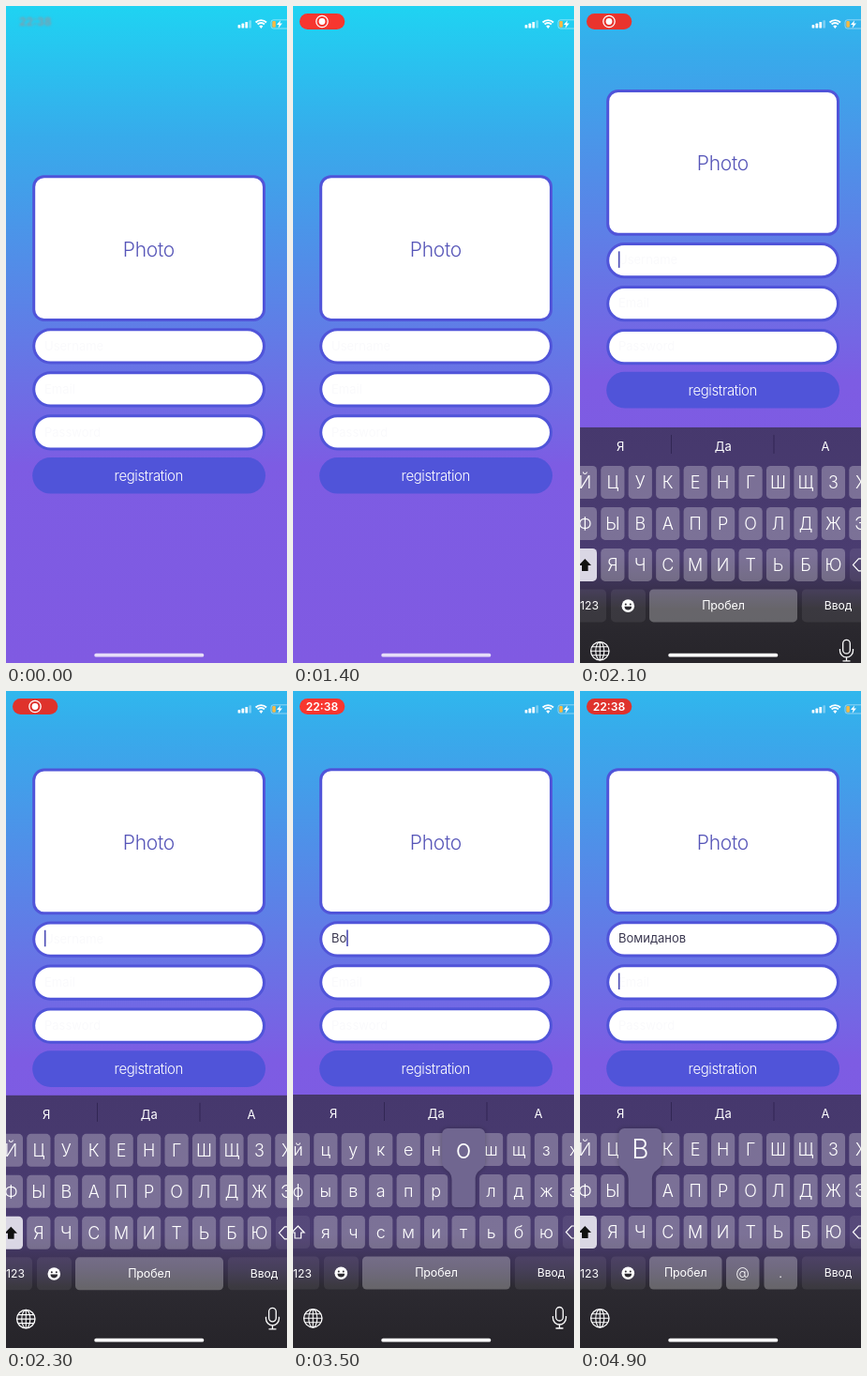
Animation of 300x700 px, one loop 5000 ms. Source, as an HTML page with a canvas:

```html
<!DOCTYPE html>
<html lang="ru">
<head>
<meta charset="utf-8">
<title>Registration form</title>
<style>
  html, body { margin: 0; width: 100%; height: 100%; overflow: hidden; background: #000; }
  canvas { display: block; width: 300px; height: 700px; }
</style>
</head>
<body>
<canvas id="stage"></canvas>
<script>
const W = 300, H = 700, LOOP = 5000, STEP = 100;
const INDIGO = '#5054d9', LIGHT_KEY = 'rgba(255,255,255,.28)', DARK_KEY = 'rgba(255,255,255,.07)';
const FIELD_Y = [343, 389, 435];
const HINTS = ['Username', 'Email', 'Password'];
const ROWS = ['ЙЦУКЕНГШЩЗХ', 'ФЫВАПРОЛДЖЭ', ' ЯЧСМИТЬБЮ'];
const PITCH = 29.45;
const NAME = 'Вомиданов';
const TYPED_AT = [3200, 3500, 3700, 3800, 4000, 4100, 4200, 4300, 4500];
const FOCUS = 1864, NEXT_FIELD = 4600, TIME_LABEL_AT = 3200;

const canvas = document.getElementById('stage');
const ctx = canvas.getContext('2d');
const dpr = window.devicePixelRatio || 1;
canvas.width = W * dpr;
canvas.height = H * dpr;

const clamp = v => Math.max(0, Math.min(1, v));
const keyX = col => 5.4 + col * PITCH;

function box(x, y, w, h, r, fill, stroke, line = 3) {
  ctx.beginPath();
  ctx.roundRect(x, y, w, h, r);
  if (fill) { ctx.fillStyle = fill; ctx.fill(); }
  if (stroke) { ctx.strokeStyle = stroke; ctx.lineWidth = line; ctx.stroke(); }
}

function label(s, x, y, size, color = '#fff', weight = 400, align = 'center', spacing = 0) {
  ctx.font = `${weight} ${size}px Inter, "Noto Sans", sans-serif`;
  ctx.letterSpacing = spacing + 'px';
  ctx.textAlign = align;
  ctx.textBaseline = 'alphabetic';
  ctx.fillStyle = color;
  ctx.fillText(s, x, y);
}

function circle(x, y, r, fill, stroke, line = 1) {
  ctx.beginPath();
  ctx.arc(x, y, r, 0, Math.PI * 2);
  if (fill) { ctx.fillStyle = fill; ctx.fill(); }
  if (stroke) { ctx.strokeStyle = stroke; ctx.lineWidth = line; ctx.stroke(); }
}

function path(points, close) {
  ctx.beginPath();
  points.forEach(([x, y]) => ctx.lineTo(x, y));
  if (close) ctx.closePath();
}

// Critically damped spring, as used by the system keyboard
function rise(t) {
  const x = Math.max(0, t - FOCUS) * 0.01835;
  return 1 - (1 + x) * Math.exp(-x);
}

function drawForm(t) {
  const g = ctx.createLinearGradient(0, 0, 0, H);
  g.addColorStop(0, '#1fd3f2');
  g.addColorStop(0.2, '#37abeb');
  g.addColorStop(0.7, '#7d5ce3');
  g.addColorStop(1, '#805ae2');
  ctx.fillStyle = g;
  ctx.fillRect(0, 0, W, H);

  box(29.7, 181.7, 245.8, 152.8, 11, '#fff', INDIGO);
  label('Photo', 152.3, 266.5, 21, '#5655b8', 300, 'center', -0.3);

  const typed = NAME.slice(0, TYPED_AT.filter(a => a <= t).length);
  FIELD_Y.forEach((y, i) => {
    box(29.7, y + 1.7, 245.8, 35.2, 17.6, '#fff', INDIGO);
    if (i || !typed) label(HINTS[i], 41, y + 23.5, 13, '#fafafc', 400, 'left');
  });
  label(typed, 41, FIELD_Y[0] + 23.3, 13, '#3b3850', 400, 'left');
  const caretX = 41.6 + (t < NEXT_FIELD ? ctx.measureText(typed).width : 0);

  if (t >= FOCUS) {
    const y = FIELD_Y[t < NEXT_FIELD ? 0 : 1];
    const idle = t - (t < TYPED_AT[0] ? FOCUS : t < NEXT_FIELD ? t : NEXT_FIELD);
    if (idle % 1000 < 550) {
      ctx.fillStyle = '#4a4bb5';
      ctx.fillRect(caretX - 0.7, y + 9.5, 1.6, 17.5);
    }
  }

  box(28.2, 481, 248.8, 38.6, 19.3, INDIGO);
  label('registration', 152.3, 506, 15, '#fff', 300, 'center', -0.38);
}

function drawShift(caps) {
  box(-8, 129, 26, 35, 4.5, caps ? '#dad7e4' : DARK_KEY);
  path([[5.3, 140], [12, 147], [8.6, 147], [8.6, 153], [2, 153], [2, 147], [-1.4, 147]], true);
  if (caps) { ctx.fillStyle = '#111'; ctx.fill(); }
  else { ctx.strokeStyle = '#fff'; ctx.lineWidth = 1.2; ctx.stroke(); }
}

function drawBottomRow(email) {
  box(-8, 172.5, 36, 35, 4.5, DARK_KEY);
  label('123', 10, 194.5, 12.2);
  box(33, 172.5, 37, 35, 4.5, DARK_KEY);
  circle(51.3, 190.2, 6.8, '#fff');
  circle(48.8, 188.5, 1, '#2c2a30');
  circle(53.8, 188.5, 1, '#2c2a30');
  ctx.beginPath();
  ctx.arc(51.3, 190.8, 3.8, 0, Math.PI);
  ctx.fillStyle = '#2c2a30';
  ctx.fill();

  const spaceW = email ? 77.5 : 158;
  box(74, 172.5, spaceW, 35, 4.5, LIGHT_KEY);
  label('Пробел', 74 + spaceW / 2, 194.3, 12.5, '#fff', 400, 'center', -0.1);
  if (email) {
    box(156, 172.5, 35.5, 35, 4.5, LIGHT_KEY);
    label('@', 173.6, 195, 15, '#fff', 300);
    box(196.5, 172.5, 35.5, 35, 4.5, LIGHT_KEY);
    label('.', 214.2, 195, 15, '#fff', 300);
  }
  box(236.8, 172.5, 80, 35, 4.5, DARK_KEY);
  label('Ввод', 275.5, 194.3, 12.2);
}

function drawGlobe(x, y) {
  circle(x, y, 9.7, null, '#fff', 1.3);
  ctx.beginPath();
  ctx.ellipse(x, y, 4.5, 9.7, 0, 0, Math.PI * 2);
  ctx.moveTo(x, y - 9.7); ctx.lineTo(x, y + 9.7);
  for (const [dy, half] of [[-4.5, 8.6], [0, 9.7], [4.5, 8.6]]) {
    ctx.moveTo(x - half, y + dy); ctx.lineTo(x + half, y + dy);
  }
  ctx.lineWidth = 1.1;
  ctx.stroke();
}

function drawMic(x, y) {
  box(x - 3.8, y - 11.5, 7.6, 14.5, 3.8, null, '#fff', 1.3);
  ctx.beginPath();
  ctx.moveTo(x - 7, y - 2);
  ctx.arc(x, y, 7, Math.PI, 0, true);
  ctx.lineTo(x + 7, y - 2);
  ctx.moveTo(x, y + 7); ctx.lineTo(x, y + 11);
  ctx.moveTo(x - 4, y + 11); ctx.lineTo(x + 4, y + 11);
  ctx.stroke();
}

function pressedKey(t) {
  if (t >= 4900) return 'В';
  const i = TYPED_AT.findIndex(a => t >= a - 50 && t < a + 100);
  return i < 0 ? '' : NAME[i].toUpperCase();
}

function drawPopup(x, y, ch) {
  const top = y - 49, r = 6;
  ctx.beginPath();
  ctx.moveTo(x - 23 + r, top);
  ctx.arcTo(x + 23, top, x + 23, top + 30, r);
  ctx.lineTo(x + 23, top + 36);
  ctx.bezierCurveTo(x + 23, top + 45, x + 12.6, top + 43, x + 12.6, top + 55);
  ctx.arcTo(x + 12.6, y + 35, x, y + 35, 4.5);
  ctx.arcTo(x - 12.6, y + 35, x - 12.6, y, 4.5);
  ctx.lineTo(x - 12.6, top + 55);
  ctx.bezierCurveTo(x - 12.6, top + 43, x - 23, top + 45, x - 23, top + 36);
  ctx.arcTo(x - 23, top, x, top, r);
  ctx.closePath();
  ctx.save();
  ctx.shadowColor = 'rgba(0,0,0,.25)';
  ctx.shadowBlur = 5;
  ctx.fillStyle = '#706690';
  ctx.fill();
  ctx.restore();
  label(ch, x, y - 17, 28, '#fff', 300);
}

function drawKeyboard(t, p) {
  const top = H - 270 * p;
  const loaded = clamp((t - 1900) / 150);
  const email = t >= NEXT_FIELD;
  const caps = email || t < TYPED_AT[0];
  const cased = c => caps ? c : c.toLowerCase();

  const edge = H - 98 * p;
  const g = ctx.createLinearGradient(0, edge - 172, 0, edge + 98);
  g.addColorStop(0, '#46386d');
  g.addColorStop(0.55, '#4a3c70');
  g.addColorStop(0.68, '#3a3150');
  g.addColorStop(0.76, '#2c2a31');
  g.addColorStop(1, '#262429');
  ctx.fillStyle = g;
  ctx.fillRect(0, top, W, H - top);
  ctx.fillStyle = `rgba(20,20,24,${0.25 * (1 - loaded)})`;
  ctx.fillRect(0, top, W, H - top);

  ctx.save();
  ctx.translate(0, top);
  ctx.fillStyle = 'rgba(20,14,45,.4)';
  for (const x of [97, 206.5]) ctx.fillRect(x, 8, 1, 20);
  ctx.globalAlpha = loaded;
  ['Я', 'Да', 'А'].forEach((s, i) => label(s, 43.3 + i * 109.4, 24.7, 13));

  const pressed = pressedKey(t);
  let popup = null;
  ROWS.forEach((row, r) => [...row].forEach((c, col) => {
    if (c === ' ') return;
    const x = keyX(col), y = 41 + r * 44;
    if (c === pressed) { popup = [x, y, cased(c)]; return; }
    box(x - 12.6, y, 25.2, 35, 4.5, LIGHT_KEY);
    label(cased(c), x, y + 24, 18, '#fff', 300);
  }));
  drawShift(caps);

  box(288, 129, 30, 35, 4.5, DARK_KEY);
  path([[306, 140], [297.5, 140], [291.5, 146.5], [297.5, 153], [306, 153]]);
  ctx.strokeStyle = '#fff';
  ctx.lineWidth = 1.2;
  ctx.stroke();

  drawBottomRow(email);
  drawGlobe(21.3, 238.3);
  if (!email) drawMic(284.5, 238);
  if (popup) drawPopup(...popup);
  ctx.restore();
}

function drawStatus(t) {
  const shown = clamp((t - 100) / 300);
  if (shown < 1) {
    ctx.save();
    ctx.globalAlpha = 1 - shown;
    ctx.filter = 'blur(1px)';
    label('22:38', 31.3, 21, 12, '#7f9fae', 700);
    ctx.restore();
  }
  if (shown > 0) {
    const glow = 0.5 + 0.5 * Math.cos((t - 1600) / 1000 * Math.PI);
    ctx.save();
    ctx.globalAlpha = shown;
    box(7, 8, 48.3, 17, 8.5, `rgb(${216 + 34 * glow},${49 + 5 * glow},${43 + 4 * glow})`);
    if (t < TIME_LABEL_AT) {
      circle(31, 16.5, 6.2, null, '#fff', 1.3);
      circle(31, 16.5, 3.4, '#fff');
    } else {
      label('22:38', 31, 21, 12.2, '#fff', 600);
    }
    ctx.restore();
  }

  for (let i = 0; i < 4; i++) {
    const h = 3.5 + i * 1.6;
    box(247.6 + i * 3.9, 23.6 - h, 2.7, h, 0.7, i < 3 ? '#fff' : 'rgba(255,255,255,.35)');
  }

  ctx.strokeStyle = '#fff';
  ctx.lineWidth = 1.9;
  for (const r of [5.2, 8.1]) {
    ctx.beginPath();
    ctx.arc(272.3, 23.2, r, -Math.PI * 0.75, -Math.PI * 0.25);
    ctx.stroke();
  }
  ctx.beginPath();
  ctx.moveTo(272.3, 24);
  ctx.arc(272.3, 23.6, 2.9, -Math.PI * 0.75, -Math.PI * 0.25);
  ctx.fillStyle = '#fff';
  ctx.fill();

  box(283, 14.8, 24, 9.2, 2.6, null, 'rgba(255,255,255,.5)', 0.9);
  box(284.3, 16, 3.6, 6.8, 1, '#f6b944');
  path([[293.2, 15.2], [289, 20], [291.6, 20], [290.6, 23.8], [295, 18.6], [292.3, 18.6]], true);
  ctx.fillStyle = '#fff';
  ctx.fill();
}

function draw(t) {
  const p = rise(t);
  ctx.setTransform(dpr, 0, 0, dpr, 0, 0);
  ctx.fillStyle = '#000';
  ctx.fillRect(0, 0, W, H);
  ctx.save();
  ctx.translate(0, -98 * p);
  drawForm(t);
  ctx.restore();
  if (p > 0) drawKeyboard(t, p);
  drawStatus(t);
  box(94.3, 689.8, 117, 3.8, 1.9, p > 0 ? '#fff' : '#e6def8');
}

// The screen refreshes in steps of 100 ms
const start = performance.now();
function tick() {
  const t = (performance.now() - start) % LOOP;
  draw(Math.floor(t / STEP) * STEP);
  requestAnimationFrame(tick);
}
tick();
</script>
</body>
</html>
```
